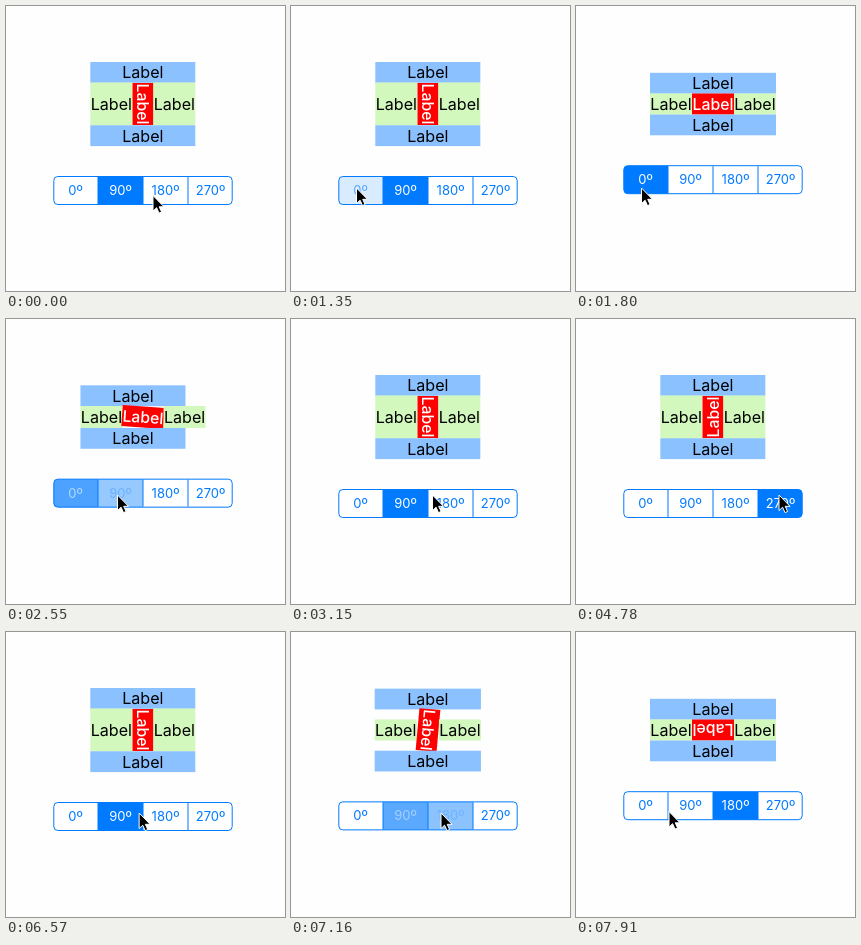
Animation, 279 px wide and 285 px high, one loop 8 s. Source, as an HTML page:

```html
<!DOCTYPE html>
<html lang="en">
<head>
<meta charset="utf-8">
<title>Rotating label</title>
<style>
html, body { margin: 0; width: 100%; height: 100%; overflow: hidden; background: #fefefe; }
svg { display: block; }
text { font-family: Inter, Roboto, sans-serif; text-anchor: middle; }
.label { font-size: 16.1px; }
.spin { font-size: 15.8px; font-weight: 500; }
.seg { font-size: 13px; }
</style>
</head>
<body>
<svg id="stage" width="279" height="285" viewBox="0 0 279 285">
  <defs><clipPath id="round"><rect x="47.8" y="170.5" width="178.4" height="28" rx="4"/></clipPath></defs>
</svg>
<script>
const LOOP = 8000, STEP = 149.2; // the screen refreshes once per step
const TURN = 290, FADE = 120, HOLD = 250, TRAVEL = 500;
const BLUE = [0, 122, 255];
const MID_X = 137, MID_Y = 98;

// Where the pointer goes, when it gets there, and which segment it taps.
const stops = [
  { arrive: 0, x: 147, y: 189.5 },
  { arrive: 900, x: 65.5, y: 182, tap: 1430, to: 0 },
  { arrive: 2400, x: 111.5, y: 176, tap: 2500, to: 1 },
  { arrive: 3300, x: 152, y: 176, tap: 3490, to: 2 },
  { arrive: 4340, x: 203, y: 176, tap: 4390, to: 3 },
  { arrive: 5530, x: 113, y: 181, tap: 5640, to: 1 },
  { arrive: 6800, x: 150, y: 181, tap: 6970, to: 2 },
  { arrive: 7900, x: 93, y: 179.5 }
];
const taps = stops.filter(s => s.tap);

const stage = document.getElementById('stage');
const clamp = v => Math.max(0, Math.min(1, v));
const lerp = (a, b, p) => a + (b - a) * p;
const smooth = p => p * p * (3 - 2 * p);
const tint = p => `rgb(${BLUE.map(c => Math.round(lerp(255, c, p)))})`;

function set(el, attrs) {
  for (const name in attrs) el.setAttribute(name, attrs[name]);
}
function add(parent, tag, attrs = {}, content = '') {
  const el = document.createElementNS('http://www.w3.org/2000/svg', tag);
  set(el, attrs);
  el.textContent = content;
  return parent.appendChild(el);
}

// A label is a coloured box with centred text.
function label(fill, color = '#000', style = 'label') {
  const g = add(stage, 'g');
  return {
    g,
    box: add(g, 'rect', { fill }),
    text: add(g, 'text', { class: style, fill: color }, 'Label')
  };
}
function place(l, x, y, width, height) {
  set(l.box, { x, y, width, height });
  set(l.text, { x: x + width / 2, y: y + height / 2 + 5.8 });
}

const above = label('#8bc1ff');
const left = label('#d2f8be');
const spin = label('#f00', '#fff', 'spin');
const right = label('#d2f8be');
const below = label('#8bc1ff');
place(spin, -21, -10.5, 42, 21);

const control = add(stage, 'g');
const fills = add(control, 'g', { 'clip-path': 'url(#round)' });
const segments = [0, 90, 180, 270].map((deg, i) => ({
  fill: add(fills, 'rect', { x: 47 + i * 45, y: 170, width: 45, height: 29 }),
  text: add(control, 'text', { class: 'seg', x: 69.5 + i * 45, y: 189 }, deg + 'º')
}));
add(control, 'path', { d: 'M92 171v27m45 0v-27m45 0v27', stroke: tint(1) });
add(control, 'rect', {
  x: 47.8, y: 170.5, width: 178.4, height: 28, rx: 4, fill: 'none', stroke: tint(1)
});

const cursor = add(stage, 'path', {
  d: 'M0 0V15.6L3.6 12.2 6 17.6 8.6 16.5 6.2 11.3H11Z',
  stroke: '#fff', 'stroke-linejoin': 'round'
});

function drawStack(from, to, p) {
  // tall: 1 while the middle label stands on its side, 0 while it lies flat.
  const growing = to % 2, tall = lerp(from % 2, growing, p);
  const mix = (flat, high) => lerp(flat, high, tall);
  const moving = p > 0;

  // A shrinking size jumps to its end value; a growing one animates.
  const barW = moving && growing ? 105 : mix(126, 105);
  const sideH = moving && !growing ? 21 : mix(21, 43);
  const barX = mix(74, 84.3), sideY = MID_Y - sideH / 2;

  place(above, barX, mix(66.8, 56), barW, 20.8);
  place(below, barX, mix(108.5, 119.3), barW, 20.8);
  place(left, mix(74, 84.3), sideY, 42, sideH);
  place(right, mix(158, 147.3), sideY, 42, sideH);
  set(spin.g, {
    transform: `translate(${MID_X} ${MID_Y}) rotate(${lerp(from, to, p) * 90})`
  });
  set(control, { transform: `translate(0 ${mix(-10.8, 0)})` });
}

function drawSegments(from, to, held, fade) {
  segments.forEach((s, i) => {
    let level = 0, ink = 0;
    if (i === from) level = ink = 1 - fade;
    if (i === to) {
      level = lerp(0.15 * held, 1, fade);
      ink = lerp(0.35 * held, 1, fade * fade);
    }
    set(s.fill, { fill: tint(level) });
    set(s.text, { fill: tint(1 - ink) });
  });
}

function drawPointer(t) {
  const next = Math.max(1, stops.findLastIndex(s => s.arrive - TRAVEL <= t));
  const a = stops[next - 1], b = stops[next];
  const p = smooth(clamp((t - b.arrive + TRAVEL) / TRAVEL));
  set(cursor, { transform: `translate(${lerp(a.x, b.x, p)} ${lerp(a.y, b.y, p)})` });
}

function draw(t) {
  const n = Math.max(0, taps.findLastIndex(s => s.tap - HOLD <= t));
  const { tap, to } = taps[n];
  const from = n ? taps[n - 1].to : 1;
  drawStack(from, to, smooth(clamp((t - tap) / TURN)));
  drawSegments(from, to, clamp((t - tap + HOLD) / 100), clamp((t - tap) / FADE));
  drawPointer(t);
}

function run() {
  const t = performance.now() % LOOP;
  draw(Math.floor(t / STEP) * STEP);
  requestAnimationFrame(run);
}
run();
</script>
</body>
</html>
```
